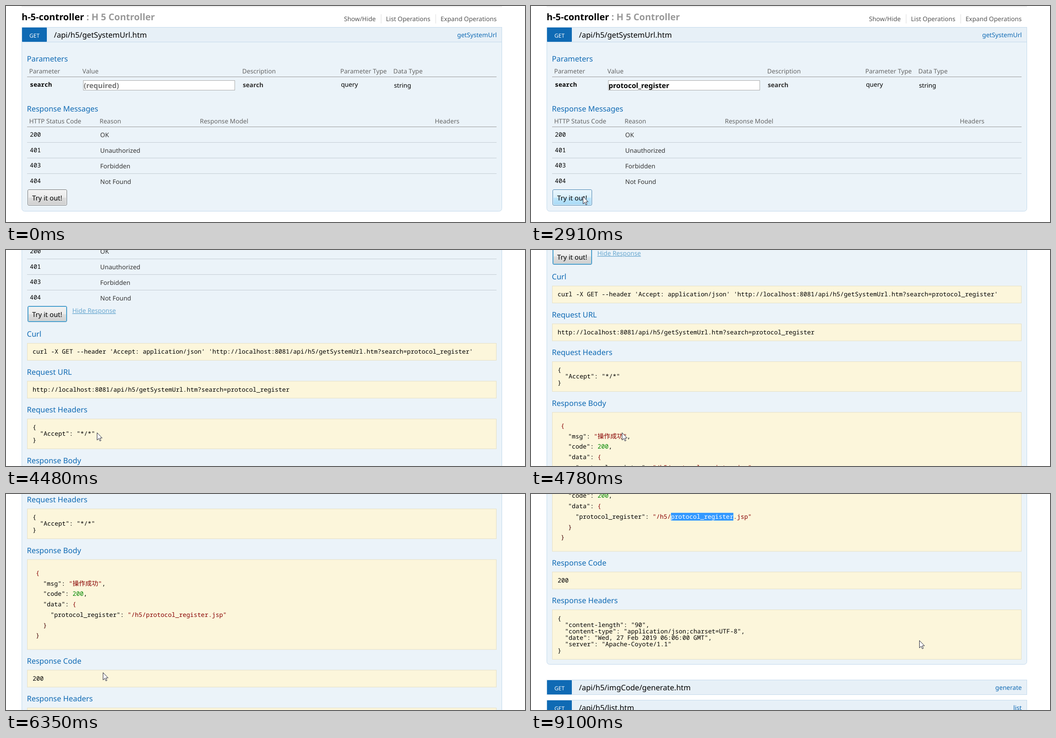
An HTML page for the animation above (9180 ms loop, 1131 by 471 pixels).

```html
<!DOCTYPE html>
<html lang="en">
<head>
<meta charset="utf-8">
<title>API console</title>
<style>
html, body { margin: 0; width: 100%; height: 100%; overflow: hidden; background: #fff; }
svg { display: block; }
text { font: 13.6px "Noto Sans", "Open Sans", sans-serif; fill: #333; text-rendering: geometricPrecision; }
.title { font-size: 20px; font-weight: bold; fill: #000; }
.soft { fill: #999; }
.nav, .th { fill: #666; }
.nav { fill: #555; }
.link { fill: #0f6ab4; }
.head { font-size: 16.45px; fill: #0f6ab4; }
.path { font-size: 16.5px; fill: #000; }
.verb { font-size: 12px; fill: #fff; }
.black { fill: #000; }
.bold { font-weight: bold; }
.input { font-size: 15.5px; font-weight: bold; fill: #000; }
.hint { fill: #757575; }
.button { font-size: 14.8px; fill: #000; }
.code { font: 13.333px "Noto Sans Mono", "Liberation Mono", monospace; fill: #000; }
.code.bold { font-weight: bold; }
.str { fill: #800; }
.num { fill: #080; }
.end { fill: #400; }
.cjk { font-family: "Noto Sans CJK SC", "Noto Sans CJK", sans-serif; font-size: 14px; }
.hide { fill: #6aa8d0; text-decoration: underline; }
</style>
</head>
<body>
<svg id="stage" width="1131" height="471" viewBox="0 0 1131 471"></svg>
<script>
const LOOP = 9180, CHAR = 8;

// Markup helpers
const text = (cls, x, y, s, more = '') => `<text class="${cls}" x="${x}" y="${y}" ${more}>${s}</text>`;
const fill = (x, y, w, h, color, more = '') =>
  `<rect x="${x}" y="${y}" width="${w}" height="${h}" fill="${color}" ${more}/>`;
const box = (x, y, w, h, color, stroke, more = '') =>
  fill(x + .5, y + .5, w - 1, h - 1, color, `stroke="${stroke}" ${more}`);
const rule = (y, color) => fill(46, y, 1023, 1, color);
const span = (cls, s, id = '') => `<tspan class="${cls}" ${id && `id="${id}"`}>${s}</tspan>`;
const lines = (x, y, step, rows) =>
  rows.map(([indent, s], i) => text('code', x + indent * CHAR, y + i * step, s)).join('');
const section = (title, y, h) =>
  text('head', 45.5, y, title) + box(46, y + 14, 1023, h, '#fcf6db', '#e5e0c6');
const operation = (y, path, name) =>
  box(34, y, 1047, 33, '#e7f0f7', '#c3d9ec') + fill(35, y + 1, 54, 31, '#0f6ab4', 'rx="1"') +
  text('verb', 51, y + 23, 'GET') + text('path', 104.5, y + 23, path) +
  text('link', 1069.5, y + 22, name, 'text-anchor="end"');
const gradient = (id, ...colors) =>
  `<linearGradient id="${id}" x2="0" y2="1">` +
  colors.map((c, i) => `<stop offset="${[0, .5, .5, 1][i]}" stop-color="${c}"/>`).join('') + '</linearGradient>';

const url = 'http://localhost:8081/api/h5/getSystemUrl.htm?search=protocol_register';
const statuses = [['200', 'OK'], ['401', 'Unauthorized'], ['403', 'Forbidden'], ['404', 'Not Found']];

const heading =
  fill(34, 1, 1047, 1, '#ddd') +
  text('title', 34, 31, `h-5-controller ${span('soft', ': H 5 Controller')}`) +
  text('nav', 736.5, 33, 'Show/Hide') + text('nav', 828, 33, 'List Operations') +
  text('nav', 947, 33, 'Expand Operations') +
  fill(817, 18, 1, 20, '#ddd') + fill(936, 18, 1, 20, '#ddd');

const parameters =
  text('head', 45.5, 121, 'Parameters') +
  text('th', 50.5, 147, 'Parameter') + text('th', 166.5, 147, 'Value') +
  text('th', 514.8, 147, 'Description') + text('th', 728.5, 147, 'Parameter Type') +
  text('th', 844, 147, 'Data Type') + rule(154, '#999') +
  text('code bold', 52, 176, 'search') +
  box(168, 162, 331, 22, '#fff', '#aaa') +
  text('input hint', 169.5, 179, '(required)', 'id="hint"') +
  text('input', 169, 179, 'protocol_register', 'id="value"') +
  fill(170, 164, 1, 18, '#000', 'id="caret"') +
  text('bold', 516, 177, 'search') + text('black', 730, 176, 'query') + text('black', 845.5, 178, 'string');

const messages =
  text('head', 45.5, 230, 'Response Messages') +
  text('th', 50.5, 256, 'HTTP Status Code') + text('th', 204, 256, 'Reason') +
  text('th', 422.5, 256, 'Response Model') + text('th', 934.5, 256, 'Headers') + rule(263, '#999') +
  statuses.map(([code, reason], i) =>
    text('code', 52, 285 + i * 33.7, code) + text('', 205.3, 286 + i * 34, reason) +
    (i < 3 ? rule(297 + i * 34, '#c3ccd3') : '')).join('') +
  box(47, 400, 86, 35, 'url(#plain)', '#707070', 'rx="2.5" id="button"') +
  `<rect id="ring" x="48.5" y="401.5" width="83" height="32" rx="1.5" fill="none"/>` +
  text('button', 57, 424, 'Try it out!') +
  text('hide', 144.5, 415, 'Hide Response', 'id="hide"');

const response =
  section('Curl', 467, 38) +
  text('code', 58, 504, `curl -X GET --header 'Accept: application/json' '${url}'`) +
  section('Request URL', 549.5, 38) + text('code', 58, 587, url) +
  section('Request Headers', 632, 66) +
  lines(58, 669, 14, [[0, '{'], [2, '"Accept": "*/*"'], [0, '}']]) +
  section('Response Body', 742.5, 197) +
  fill(305, 869, 136, 17, '#39f', 'id="mark"') +
  lines(65, 791, 22.7, [
    [0, span('str', '{')],
    [2, `"msg": ${span('str', `"${span('cjk', '操作成功')}"`)},`],
    [2, `"code": ${span('num', '200')},`],
    [2, `"data": ${span('str', '{')}`],
    [4, `"protocol_register": ${span('str', `"/h5/${span('', 'protocol_register', 'word')}.jsp"`)}`],
    [2, span('end', '}')],
    [0, span('end', '}')]]) +
  section('Response Code', 983.5, 38) + text('code', 58, 1021, '200') +
  section('Response Headers', 1066, 109) +
  lines(58, 1104, 14, [
    [0, '{'], [2, '"content-length": "90",'], [2, '"content-type": "application/json;charset=UTF-8",'],
    [2, '"date": "Wed, 27 Feb 2019 06:06:00 GMT",'], [2, '"server": "Apache-Coyote/1.1"'], [0, '}']]);

document.getElementById('stage').innerHTML = `
  <defs>
    ${gradient('plain', '#f2f2f2', '#ebebeb', '#dddddd', '#cfcfcf')}
    ${gradient('hot', '#eaf6fd', '#d9f0fc', '#bee6fd', '#a7d9f5')}
    <clipPath id="reveal"><rect id="window" x="34" y="440" width="1047"/></clipPath>
  </defs>
  <g id="page">
    ${heading}
    <rect id="panel" x="34.5" y="60.5" width="1046" rx="6" fill="#ebf3f9" stroke="#c3d9ec"/>
    ${operation(46, '/api/h5/getSystemUrl.htm', 'getSystemUrl')}
    ${parameters}${messages}
    <g clip-path="url(#reveal)"><g id="response">${response}</g></g>
    <g id="more">
      ${operation(1233, '/api/h5/imgCode/generate.htm', 'generate')}
      ${operation(1277, '/api/h5/list.htm', 'list')}
    </g>
  </g>
  <g id="pointer">
    <path id="arrow" d="M.5 .5V16.5L4.2 13L6.6 18.5L9 17.5L6.6 12H11.5Z" fill="#fff" stroke="#223"/>
    <path id="beam" d="M-3 -8H-1L0 -7L1 -8H3M0 -7V7M-3 8H-1L0 7L1 8H3" fill="none" stroke="#000"/>
  </g>`;

const el = Object.fromEntries([...document.querySelectorAll('[id]')].map(e => [e.id, e]));
const show = (e, on) => e.setAttribute('visibility', on ? 'visible' : 'hidden');

const bursts = [
  [70, 360, 5], [510, 670, 3], [1150, 1150, 1], [1660, 2530, 11], [2630, 2910, 5], [3160, 3540, 6],
  [3790, 4630, 12], [4710, 4950, 4], [5330, 5730, 6], [5950, 5950, 1], [6180, 7020, 12],
  [7100, 7410, 5], [7640, 7870, 4], [8020, 8870, 12], [8950, 9100, 3]];

const scrollKeys = [
  [3714, 0], [4172, 154], [4630, 340], [4790, 403], [4950, 445], [5250, 445],
  [5730, 545], [6104, 545], [6333, 614], [6791, 828]];

const pointerKeys = [
  [70, 757, 316], [360, 373.5, 177.5], [430, 373.5, 177.5], [670, 350.5, 177.5], [1750, 350.5, 177.5],
  [2430, 108, 412], [2910, 113, 415], [3084, 113, 415], [3540, 198, 398], [5730, 198, 398],
  [5950, 211, 389], [6560, 211, 389], [6791, 237, 358], [7022, 349, 161], [7410, 403.5, 44.5],
  [7943, 403.5, 44.5], [8480, 975, 440], [8870, 867, 343], [8875, 867, 343], [9100, 846, 319]];

// The screen only refreshes inside bursts, at even steps
function snap(t) {
  const burst = bursts.findLast(b => b[0] <= t);
  if (!burst) return 0;
  const [start, end, n] = burst;
  if (n === 1) return start;
  const step = (end - start) / (n - 1);
  return start + Math.min(n - 1, Math.floor((t - start) / step + .15)) * step;
}

function sample(keys, t) {
  const next = keys.findIndex(k => k[0] > t);
  if (next === 0) return keys[0].slice(1);
  if (next < 0) return keys.at(-1).slice(1);
  const a = keys[next - 1], b = keys[next], p = (t - a[0]) / (b[0] - a[0]);
  return a.slice(1).map((v, i) => v + (b[i + 1] - v) * p);
}

function draw(now) {
  const t = snap(now % LOOP);
  const [scroll] = sample(scrollKeys, t);
  const [x, y] = sample(pointerKeys, t).map(v => Math.round(v * 2) / 2);
  const opening = Math.min(1, Math.max(0, (t - 3084) / 456));
  const bottom = Math.round(448 + 752 * (.5 - Math.cos(Math.PI * opening) / 2));

  el.page.setAttribute('transform', `translate(0 ${-Math.round(scroll)})`);
  el.panel.setAttribute('height', bottom - 61);
  el.window.setAttribute('height', bottom - 450);
  el.more.setAttribute('transform', `translate(0 ${bottom - 1200})`);
  show(el.response, opening > 0);
  show(el.hide, opening > 0);

  const filled = t >= 1660;
  show(el.hint, !filled);
  show(el.value, filled);
  show(el.caret, (t >= 510 && t < 1150) || (filled && t < 2630));
  el.caret.setAttribute('x', filled ? 303 : 170);

  const top = 400 - scroll;
  const hot = t > 70 && x >= 47 && x < 133 && y >= top && y < top + 35;
  const focused = t >= 3160;
  el.button.setAttribute('fill', hot ? 'url(#hot)' : 'url(#plain)');
  el.button.setAttribute('stroke', hot || focused ? '#3c7fb1' : '#707070');
  el.ring.setAttribute('stroke', focused && !hot ? '#58c0ea' : '#fafcfd');

  const marked = t >= 7640;
  show(el.mark, marked);
  el.word.style.fill = marked ? '#fff' : '';

  const beam = (t >= 290 && t < 1800) || (t >= 7400 && t < 8020);
  el.pointer.setAttribute('transform', `translate(${x} ${y})`);
  show(el.arrow, t >= 70 && !beam);
  show(el.beam, beam);
}

const begin = performance.now();
function tick() {
  draw(performance.now() - begin);
  requestAnimationFrame(tick);
}
tick();
</script>
</body>
</html>
```
